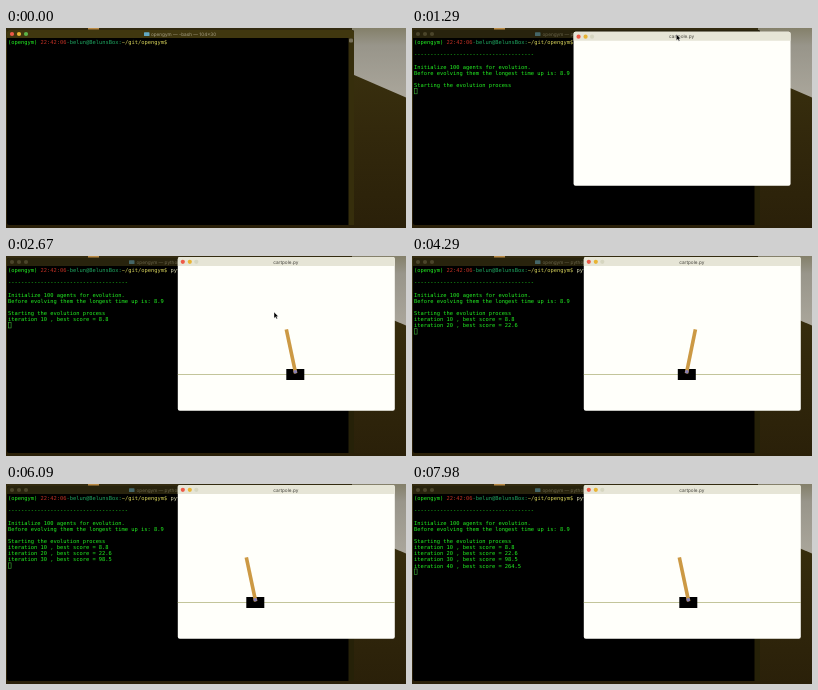
An HTML page that plays this animation: 400 px wide and 200 px high, repeating every 8000 ms.

```html
<!DOCTYPE html>
<html lang="en">
<head>
<meta charset="utf-8">
<title>Cart pole evolution</title>
<style>
html, body { margin: 0; width: 100%; height: 100%; overflow: hidden; background: #000; }
svg { display: block; width: 100vw; height: 100vh; }
text { white-space: pre; text-rendering: geometricPrecision; }
.mono { font: 5.4px "DejaVu Sans Mono", monospace; fill: #22f022; }
.title { font: 4.7px Inter, Roboto, sans-serif; text-anchor: middle; }
</style>
</head>
<body>
<svg viewBox="0 0 400 200" preserveAspectRatio="none">
  <defs>
    <linearGradient id="ground" x1="0" y1="0" x2="0" y2="1">
      <stop offset="0" stop-color="#3d340f"/>
      <stop offset=".5" stop-color="#33290c"/>
      <stop offset="1" stop-color="#2a2009"/>
    </linearGradient>
    <linearGradient id="sky" x1="0" y1="0" x2="0" y2="1">
      <stop offset="0" stop-color="#84806a"/>
      <stop offset=".25" stop-color="#98958a"/>
      <stop offset="1" stop-color="#aaa69b"/>
    </linearGradient>
  </defs>

  <rect width="400" height="200" fill="url(#ground)"/>
  <path d="M340 0H400V69.5L340 43.5Z" fill="url(#sky)"/>
  <rect width="346" height="2" fill="#332b10"/>
  <rect x="82" width="11" height="1.5" fill="#b98a45"/>

  <rect x="1" y="2" width="347" height="195" rx="2" fill="#000"/>
  <path id="bar" d="M1 10V4Q1 2 3 2H346Q348 2 348 4V10Z"/>
  <rect id="scroll" x="342.5" y="10" width="5.5" height="187"/>
  <rect x="343" y="10.5" width="4" height="4" rx="1" fill="#77705a"/>
  <g id="termLights"></g>
  <rect id="folder" y="4.3" width="5.5" height="3.8" rx=".6" fill="#62a9c4"/>
  <text id="termTitle" class="title" y="7.9"></text>
  <g id="lines" class="mono"></g>
  <rect id="caret" width="2.8" height="5.4" stroke-width=".6"/>

  <g id="win">
    <rect width="217" height="153.8" rx="2" fill="#fffffa"/>
    <path id="winBar" d="M0 9V2Q0 0 2 0H215Q217 0 217 2V9Z"/>
    <g id="winLights"></g>
    <text id="winTitle" class="title" x="108" y="6.6">cartpole.py</text>
    <g id="scene">
      <path d="M0 117.5H217" stroke="#a9ad72" stroke-width=".7"/>
      <g id="cart">
        <rect x="-9" y="112" width="18" height="11" fill="#000"/>
        <g transform="translate(0 114.7)">
          <rect id="pole" x="-1.8" y="-43.2" width="3.6" height="45" fill="#cc9944"/>
          <circle r="1.8" fill="#8580b8"/>
        </g>
      </g>
    </g>
  </g>
  <path id="mouse" d="M0 0V6.2L1.5 4.9L2.5 7L3.5 6.5L2.6 4.5H4.4Z" fill="#000" stroke="#fff" stroke-width=".4"/>
</svg>
<script>
const LOOP = 8000, CHAR = 3.25, ROW = 6.15;
const $ = id => document.getElementById(id);
const set = (node, attrs) => {
  for (const key in attrs) node.setAttribute(key, attrs[key]);
  return node;
};
const add = (parent, tag, attrs) =>
  parent.appendChild(set(document.createElementNS('http://www.w3.org/2000/svg', tag), attrs));
const show = (node, on) => set(node, { visibility: on ? 'visible' : 'hidden' });
const clamp = u => Math.min(1, Math.max(0, u));
const ease = u => u * u * (3 - 2 * u);

const command = ' python cartpole.py';
const typing = { start: 100, end: 460, enter: 540 };

// Appearance time, row, text
const output = [
  [560, 2, '-'.repeat(37)],
  [600, 4, 'Initialize 100 agents for evolution.'],
  [780, 5, 'Before evolving them the longest time up is: 8.9'],
  [1260, 7, 'Starting the evolution process'],
  [2200, 8, 'iteration 10 , best score = 8.8'],
  [3700, 9, 'iteration 20 , best score = 22.6'],
  [4700, 10, 'iteration 30 , best score = 98.5'],
  [6900, 11, 'iteration 40 , best score = 264.5']
];

// One run each: start, duration, final cart offset, final tilt, swings
const runs = [
  [1300, 150, -8, 14, 0],
  [2230, 130, 9, -12, 0],
  [3730, 240, -5.5, 11.5, 2],
  [4740, 760, -31, -12, 5],
  [6940, 1000, -4, -12, 8]
];

// Time, x, y
const windowPath = [[960, 135.3, 1.6], [1500, 174.7, 5], [1580, 174.7, 5], [1800, 171.8, 1]];
const mousePath = [[960, 239, 1], [1500, 277, 9], [1580, 277, 9], [1800, 275, 5], [2000, 275, 5], [2500, 268, 56]];

function along(path, t) {
  let i = 0;
  while (i < path.length - 2 && t > path[i + 1][0]) i++;
  const [a, b] = [path[i], path[i + 1]];
  const u = ease(clamp((t - a[0]) / (b[0] - a[0])));
  return [1, 2].map(k => a[k] + (b[k] - a[k]) * u);
}

function line(row, text, fill = '#22f022', col = 0) {
  const node = add($('lines'), 'text', { x: 2 + col * CHAR, y: 15.9 + row * ROW });
  node.style.fill = fill;
  node.textContent = text;
  return node;
}

const lights = (id, xs, y) => xs.map(x => add($(id), 'circle', { cx: x, cy: y, r: 2.1 }));
const paint = (dots, colours) => dots.forEach((dot, i) => set(dot, { fill: colours[i] }));

line(0, '(opengym)');
line(0, '22:42:06', '#c03024', 10);
line(0, '-belun@BelunsBox:', '#1fa862', 18);
line(0, '~/git/opengym$', '#d8d45a', 35);
const typed = line(0, '', '#d8d8b0', 49);
const printed = output.map(([at, row, text]) => ({ at, row, node: line(row, text) }));
const termDots = lights('termLights', [6, 13, 20], 6);
const winDots = lights('winLights', [5, 12, 18.5], 4.8);

function drawTerminal(t) {
  const active = t < 880;
  const running = t >= typing.enter;
  const count = Math.floor(command.length * clamp((t - typing.start) / (typing.end - typing.start)));
  typed.textContent = command.slice(0, count);

  let row = running ? 1 : 0;
  for (const p of printed) {
    const on = t >= p.at;
    show(p.node, on);
    if (on) row = p.row + 1;
  }
  const col = running ? 0 : 50 + Math.max(0, count - 1);
  set($('caret'), {
    x: 2.3 + col * CHAR, y: 11.2 + row * ROW,
    fill: active ? '#3c8a38' : 'none',
    stroke: active ? 'none' : '#3fae38'
  });
  show($('caret'), t >= typing.start);

  set($('bar'), { fill: active ? '#40370f' : '#28230d' });
  set($('scroll'), { fill: active ? '#362e0c' : '#262108' });
  paint(termDots, active ? ['#ee5a48', '#e8b433', '#5cb548'] : Array(3).fill('#4b452a'));
  $('termTitle').textContent = 'opengym — ' + (running ? 'python cartpole.py' : '-bash') + ' — 104×30';
  set($('termTitle'), { x: 177.5, fill: active ? '#a8a287' : '#6a654c' });
  set($('folder'), { x: running ? 123 : 138, opacity: active ? 1 : .5 });
}

function drawWindow(t) {
  const [x, y] = along(windowPath, t);
  const active = t >= 1060;
  set($('win'), { transform: `translate(${x} ${y})` });
  show($('win'), t >= 880);
  set($('winBar'), { fill: active ? '#e6e5d6' : '#f8f7e8' });
  set($('winTitle'), { fill: active ? '#45443c' : '#96937c' });
  paint(winDots, active ? ['#ee5a48', '#e8b433', '#d6d6c0'] : Array(3).fill('#d6d4c2'));

  const [mx, my] = along(mousePath, t);
  set($('mouse'), { transform: `translate(${mx} ${my})` });
  show($('mouse'), t >= 880 && t < 3300);
}

function drawCart(t) {
  const run = runs.filter(r => t >= r[0]).pop();
  $('scene').style.display = run ? '' : 'none';
  if (!run) return;
  const [start, span, shift, tilt, swings] = run;
  const u = clamp((t - start) / span);
  const sway = swings ? Math.sin(2 * Math.PI * swings * u) * (1 - u) : 0;
  const x = 108.5 + shift * u * u + sway * 2;
  const angle = tilt * u ** (swings ? 4 : 2) - sway * 4;
  set($('cart'), { transform: `translate(${x} 0)` });
  set($('pole'), { transform: `rotate(${angle})` });
}

function frame(now) {
  const t = now % LOOP;
  drawTerminal(t);
  drawWindow(t);
  drawCart(t);
  requestAnimationFrame(frame);
}

frame(0);
</script>
</body>
</html>
```
